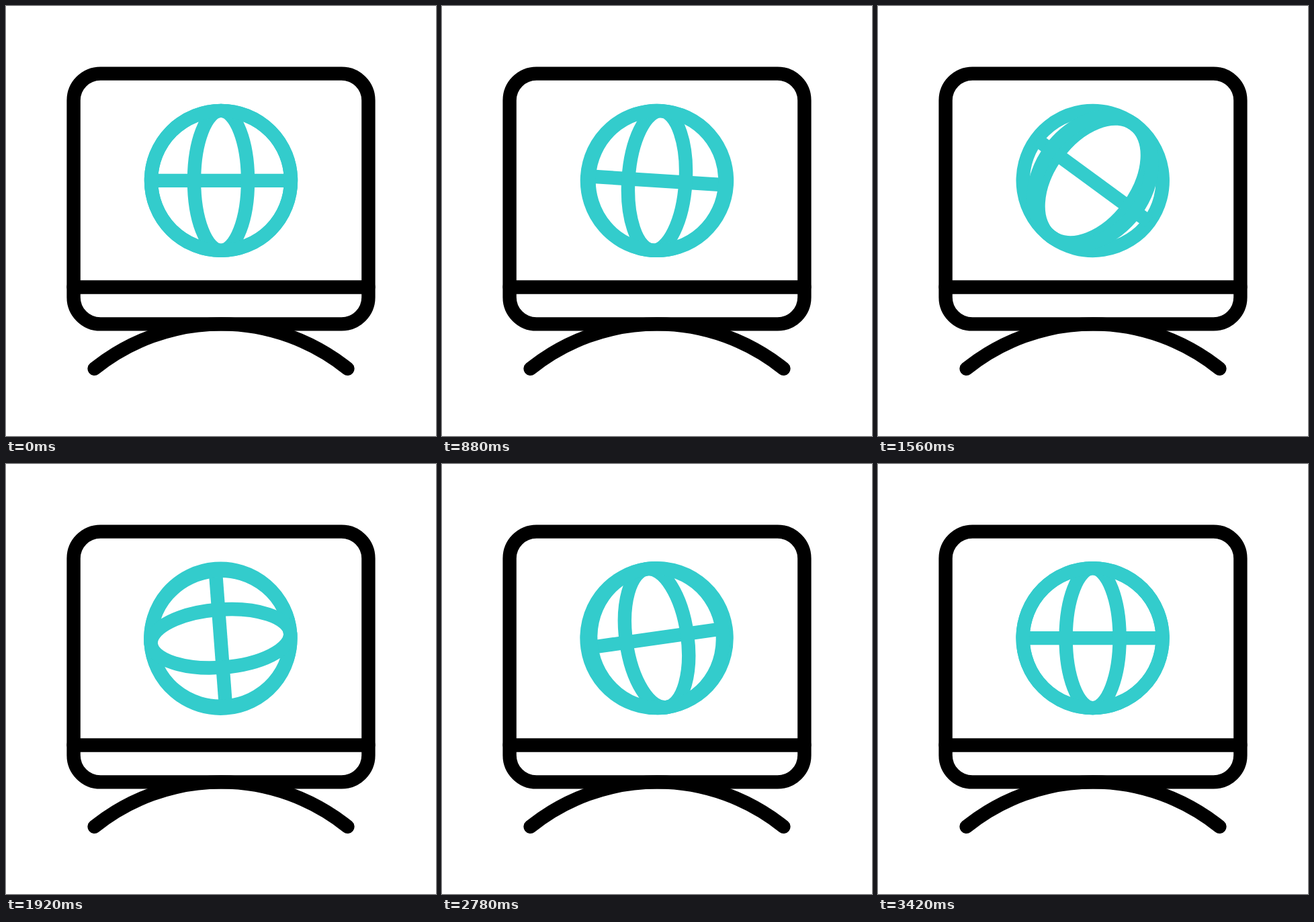
Recreate the animation shown at these times as an HTML page. Size 640 px wide and 640 px high, loop 3600 ms.

```html
<!DOCTYPE html>
<html lang="en">
<head>
<meta charset="utf-8">
<title>Globe on a screen</title>
<style>
  html, body { margin: 0; width: 100%; height: 100%; overflow: hidden; background: #fff; }
  svg { display: block; width: 100%; height: 100%; }
</style>
</head>
<body>
<svg viewBox="0 0 640 640" fill="none" stroke-width="20.4">
  <g stroke="#000" stroke-linecap="round">
    <rect x="100.6" y="100.6" width="438.8" height="372.8" rx="40"/>
    <path d="M100.6 418.5H539.4M131.6 539.8A300.5 300.5 0 0 1 508.4 539.8"/>
  </g>
  <g id="globe" stroke="#33cccc">
    <circle r="104"/>
    <path d="M-104 0H104"/>
    <ellipse id="meridian" ry="104"/>
    <ellipse id="rim" ry="104"/>
  </g>
</svg>
<script>
  const LOOP = 3600, START = 220, END = 3420;
  const MIDDLE = 1948, SOFTNESS = 565;
  const NARROW = 40, WIDE = 104;
  const [globe, meridian, rim] = ['globe', 'meridian', 'rim'].map(id => document.getElementById(id));

  const sigmoid = t => Math.tanh((t - MIDDLE) / SOFTNESS);

  // Half a turn with soft ends, exact at START and END.
  function angleAt(time) {
    const t = Math.min(END, Math.max(START, time));
    const limit = Math.abs(sigmoid(t < MIDDLE ? START : END));
    return 90 + 90 * sigmoid(t) / limit;
  }

  function draw(time) {
    const angle = angleAt(time);
    // The meridian and the rim trade widths every quarter turn.
    const swap = 1 - Math.abs(angle / 90 - 1);
    const grow = (WIDE - NARROW) * swap;
    meridian.setAttribute('rx', NARROW + grow);
    rim.setAttribute('rx', WIDE - grow);
    // The pivot sits slightly off the globe's centre.
    globe.setAttribute('transform', `translate(319.8 259.5) rotate(${angle}) translate(.2 .4)`);
  }

  const origin = performance.now();
  function tick() {
    draw((performance.now() - origin) % LOOP);
    requestAnimationFrame(tick);
  }
  tick();
</script>
</body>
</html>
```
